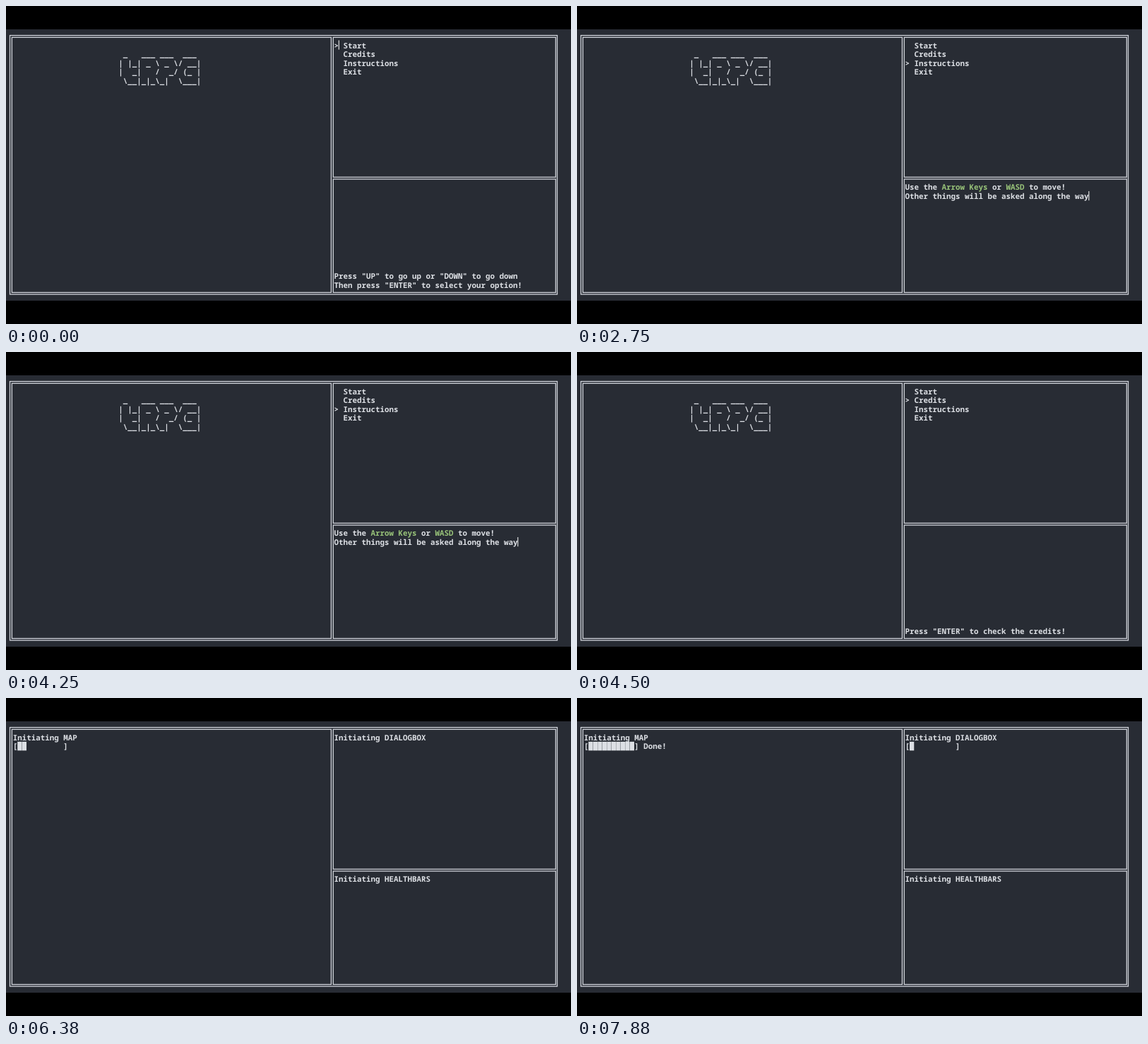
An HTML page for the animation above (8000 ms loop, 800 by 450 pixels).

```html
<!DOCTYPE html>
<html lang="en">
<head>
<meta charset="utf-8">
<title>Terminal RPG</title>
<style>
  html, body { margin: 0; width: 100%; height: 100%; overflow: hidden; background: #000; }
  svg { display: block; width: 100%; height: 100%; }
  text {
    font: 600 10.8333px "Noto Sans Mono", "DejaVu Sans Mono", monospace;
    font-variant-ligatures: none;
    white-space: pre;
    text-rendering: geometricPrecision;
    fill: #dcdfe4;
  }
  .key { fill: #98c379; }
  .frame { fill: none; stroke: #d0d3da; stroke-width: 1.3; }
</style>
</head>
<body>
<svg viewBox="0 0 800 450">
  <rect width="800" height="450" fill="#000"/>
  <rect y="33" width="800" height="384" fill="#282c34"/>
  <g class="frame">
    <rect x="5.5" y="41.6" width="775" height="366.4"/>
    <rect x="8.4" y="44.4" width="452" height="361"/>
    <rect x="463.3" y="44.4" width="315" height="197.8"/>
    <rect x="463.3" y="245" width="315" height="160.4"/>
  </g>
  <g id="screen"></g>
</svg>
<script>
const LOOP = 8000, CELL = 6.5, LINE = 12.56;
const LEFT = 9.75, RIGHT = 464.5, INFO = 16;
const screen = document.getElementById('screen');

const logo = [
  ' _   ___ ___  ___',
  '| |_| _ \\ _ \\/ __|',
  '|  _|   /  _/ (_ |',
  ' \\__|_|_\\_|  \\___|'
];
const options = ['Start', 'Credits', 'Instructions', 'Exit'];

// Words between asterisks are highlighted.
const info = {
  intro: [26, 'Press "UP" to go up or "DOWN" to go down',
              'Then press "ENTER" to select your option!'],
  start: [INFO, 'Press *ENTER* to start the game!'],
  credits: [27, 'Press "ENTER" to check the credits!'],
  help: [INFO, 'Use the *Arrow Keys* or *WASD* to move!',
               'Other things will be asked along the way'],
  exit: [INFO, 'Press *ENTER* to exit the game!']
};

// time, selected option, info panel, cursor visible
const menuSteps = [
  [0, 0, 'intro', 1], [380, 0, 'intro', 0], [880, 0, 'intro', 1],
  [1500, 0, 'intro', 0], [2000, 0, 'intro', 1],
  [2380, 1, 'credits', 1], [2500, 1, 'credits', 0],
  [2750, 2, 'help', 1], [2880, 2, 'help', 0],
  [3130, 3, 'exit', 1], [3250, 3, 'exit', 0],
  [3380, 2, 'help', 1], [3500, 2, 'help', 0],
  [3630, 3, 'exit', 1], [3750, 3, 'exit', 0],
  [3880, 2, 'help', 1], [4000, 1, 'credits', 1], [4130, 1, 'credits', 0],
  [4250, 2, 'help', 1], [4380, 2, 'help', 0], [4500, 1, 'credits', 0],
  [4750, 0, 'start', 0], [4880, 0, 'start', 1], [5380, 0, 'start', 0]
];
const LOADING = 5750, MAP_BAR = 6130, MAP_DONE = 7500, DIALOG_BAR = 7880;

const escapeText = s => s.replace(/&/g, '&amp;').replace(/</g, '&lt;').replace(/>/g, '&gt;');

function print(x, row, str) {
  const body = escapeText(str).replace(/\*(.+?)\*/g, '<tspan class="key">$1</tspan>');
  return `<text x="${x}" y="${(59.5 + row * LINE).toFixed(2)}">${body}</text>`;
}

function cursor(x, row, col) {
  return `<rect x="${x + col * CELL - 0.2}" y="${48.5 + row * LINE}" width="1" height="13.2" fill="#fff"/>`;
}

function bar(x, row, count) {
  let out = print(x, row, '[' + ' '.repeat(10) + ']');
  for (let i = 0; i < count; i++) {
    out += `<rect x="${x + (i + 1) * CELL}" y="${49.3 + row * LINE}" width="6.25" height="12.5" fill="#dcdfe4"/>`;
  }
  return out;
}

function drawMenu(t) {
  const [, pick, name, blink] = menuSteps.filter(s => s[0] <= t).pop();
  const [first, ...lines] = info[name];
  let out = logo.map((s, i) => print(LEFT + 23 * CELL, i + 1, s)).join('');
  out += options.map((s, i) => print(RIGHT, i, (i === pick ? '> ' : '  ') + s)).join('');
  out += lines.map((s, i) => print(RIGHT, first + i, s)).join('');
  if (blink) {
    const last = lines.length - 1;
    out += name === 'intro'
      ? cursor(RIGHT, 0, 1)
      : cursor(RIGHT, first + last, lines[last].replace(/\*/g, '').length);
  }
  return out;
}

function drawLoading(t) {
  let out = print(LEFT, 0, 'Initiating MAP')
    + print(RIGHT, 0, 'Initiating DIALOGBOX')
    + print(RIGHT, INFO, 'Initiating HEALTHBARS');
  if (t < MAP_BAR) return out + cursor(RIGHT, INFO, 21);
  out += bar(LEFT, 1, Math.min(10, Math.floor((t - MAP_BAR + 5) / 125)));
  if (t >= MAP_DONE) out += print(LEFT + 13 * CELL, 1, 'Done!');
  if (t >= MAP_DONE && t < 7630) out += cursor(LEFT, 1, 18);
  if (t >= DIALOG_BAR) out += bar(RIGHT, 1, 1);
  return out;
}

let shown = '';
function render(t) {
  const next = t < LOADING ? drawMenu(t) : drawLoading(t);
  if (next !== shown) screen.innerHTML = shown = next;
}

const begin = performance.now();
function tick() {
  render((performance.now() - begin) % LOOP);
  requestAnimationFrame(tick);
}
tick();
</script>
</body>
</html>
```
